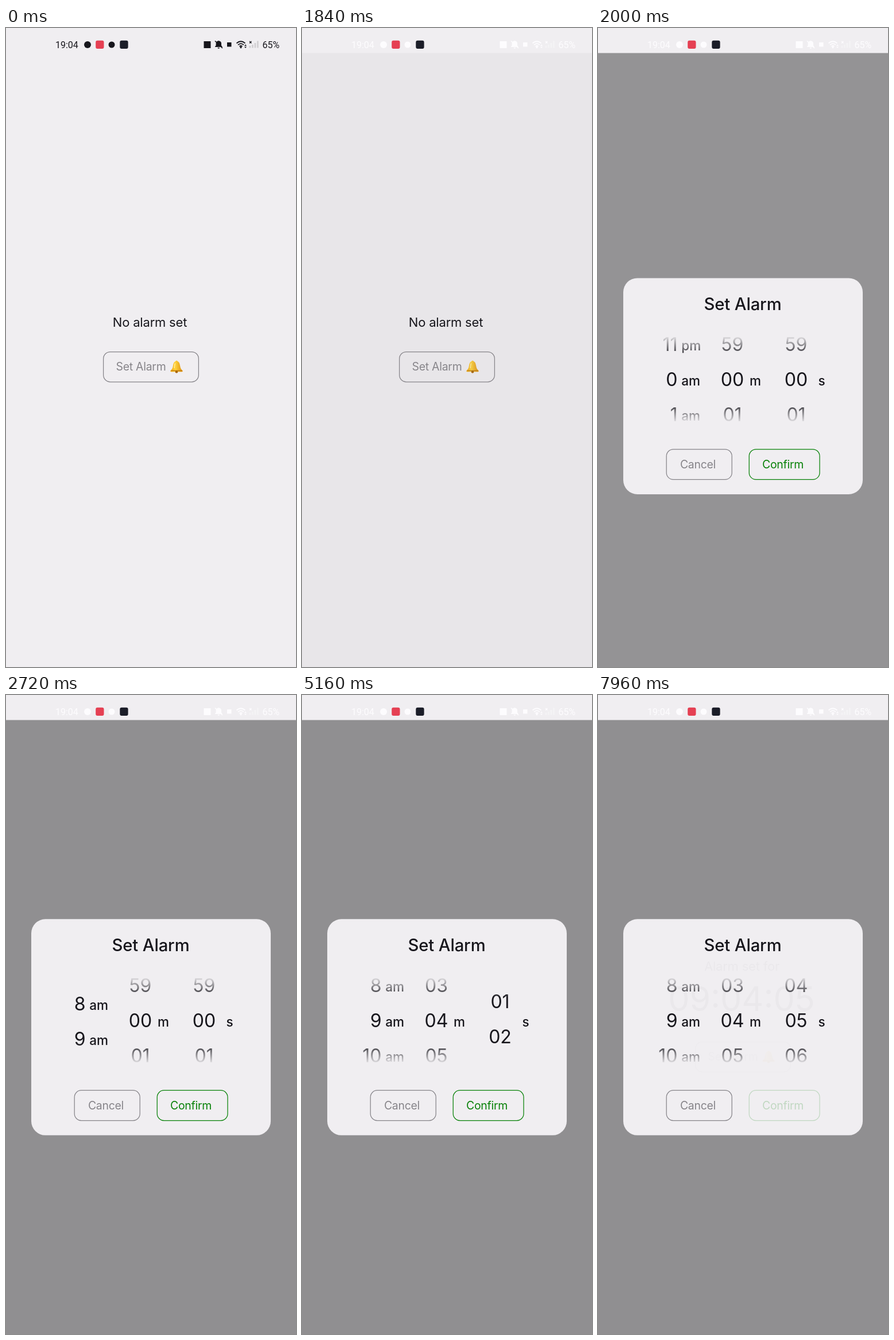
An HTML page for the animation above (8 s loop, 505 by 1110 pixels).

```html
<!DOCTYPE html>
<html lang="en">
<head>
<meta charset="utf-8">
<title>Set Alarm</title>
<style>
  html, body { margin: 0; width: 100%; height: 100%; overflow: hidden; background: #f0eef1; }
  svg { display: block; width: 505px; height: 1110px; font-family: Inter, sans-serif; fill: #17161c; }
  .mid { text-anchor: middle; }
  .end { text-anchor: end; }
  .num { font-size: 32px; }
  .unit { font-size: 22.5px; font-weight: 500; }
  .label { font-size: 22px; letter-spacing: -.2px; }
  .btn { font-size: 19.4px; letter-spacing: -.25px; }
  .box { fill: none; stroke: #868489; stroke-width: 1.25; }
  .grey { fill: #868489; }
  .green { fill: #078107; }
  .box.green { fill: none; stroke: #078107; }
  #status { font: 16px Roboto, sans-serif; }
  #status .line { fill: none; stroke: currentColor; stroke-width: 1.7; }
</style>
</head>
<body>
<svg viewBox="0 0 505 1110">
  <defs>
    <linearGradient id="bellGold" x2="1" y2="0">
      <stop offset="0" stop-color="#f2a80d"/>
      <stop offset=".4" stop-color="#ffd23c"/>
      <stop offset="1" stop-color="#dc8f12"/>
    </linearGradient>
    <linearGradient id="fadeTop" x2="0" y2="1">
      <stop offset="0" stop-color="#f0eef1"/>
      <stop offset="1" stop-color="#f0eef1" stop-opacity="0"/>
    </linearGradient>
    <linearGradient id="fadeBottom" x2="0" y2="1">
      <stop offset="0" stop-color="#f0eef1" stop-opacity="0"/>
      <stop offset="1" stop-color="#f0eef1"/>
    </linearGradient>
    <clipPath id="window"><rect x="90" y="489" width="310" height="152"/></clipPath>
    <g id="bell">
      <path d="M-1.800 -9.500a1.900 1.900 0 0 1 3.600 0C4.800 -8.600 5.600 -5 6.200 -1.500 6.900 2.500 7.600 4.200 10.400 6.400Q11.300 8.500 9 8.700H-9Q-11.300 8.500 -10.400 6.400C-7.600 4.200 -6.900 2.500 -6.200 -1.500 -5.600 -5 -4.800 -8.600 -1.800 -9.500Z" fill="url(#bellGold)"/>
      <path d="M-9.300 6.800H9.300" stroke="#b9740c" stroke-width="1.200"/>
      <circle cy="8.800" r="2.300" fill="#a8650c"/>
      <path d="M-2.800 -5.500Q-3.600 -2 -3.900 2" fill="none" stroke="#ffec9a" stroke-width="1.600" stroke-linecap="round"/>
    </g>
  </defs>

  <rect width="505" height="1110" fill="#f0eef1"/>
  <text class="label mid" x="250.500" y="519">No alarm set</text>
  <g id="setButton">
    <rect class="box" x="169.600" y="562.500" width="165.800" height="52.300" rx="12"/>
    <text class="btn grey mid" x="235" y="595.300">Set Alarm</text>
    <use href="#bell" x="297" y="588.500"/>
  </g>
  <rect id="scrim" y="43.500" width="505" height="1067" fill="#000" opacity="0"/>

  <g id="status" fill="currentColor">
    <text x="86" y="34.800">19:04</text>
    <circle cx="142" cy="29" r="6"/>
    <rect x="156.200" y="21.800" width="14.300" height="14.300" rx="3" fill="#e54053"/>
    <circle cx="184" cy="29" r="5.500"/>
    <rect x="198.300" y="21.800" width="14.300" height="14.300" rx="3" fill="#1b1d28"/>
    <rect x="344.500" y="23" width="12" height="12"/>
    <path d="M364 33V32l1.600-1.600V27q0-3.600 3.500-4.400a1.300 1.300 0 0 1 2.200 0Q375 23.400 375 27v3.400L376.500 32v1zM368.500 34h3.500a1.700 1.700 0 0 1-3.500 0z"/>
    <path class="line" d="M364 22.500L377 35"/>
    <rect x="385" y="25" width="7.500" height="7.500"/>
    <path class="line" d="M401.500 26.500q7.500-6.500 15 0M404 29.300q5-4.500 10 0M406.500 32q2.500-2 5 0"/>
    <circle cx="409" cy="33.700" r="1.600"/>
    <path d="M415 31l2-2.500 2 2.500zM415 32.500h4l-2 2.500z"/>
    <path id="bars" d="M423.500 31h2.800v3.500h-2.800zM428 29h2.800v5.500h-2.800zM432.500 26h2.800v8.500h-2.800zM437 22.500h2.800v12h-2.800z" fill="#d2d0d3"/>
    <path class="line" style="stroke-width:1.200" d="M424 23l3.500 3.500M427.500 23L424 26.500"/>
    <text x="446.500" y="34.800">65%</text>
  </g>

  <g id="modal" transform="translate(0 1110)">
    <rect x="44" y="389.300" width="417" height="375.500" rx="24.600" fill="#f0eef1"/>
    <text class="mid" x="252" y="445" font-size="29.200" font-weight="500" letter-spacing="-.1">Set Alarm</text>
    <g clip-path="url(#window)">
      <g id="hours"></g>
      <g id="minutes"></g>
      <g id="seconds"></g>
      <rect x="90" y="488.500" width="310" height="37" fill="url(#fadeTop)"/>
      <rect x="90" y="604.500" width="310" height="37" fill="url(#fadeBottom)"/>
    </g>
    <text class="unit" x="264" y="575.500">m</text>
    <text class="unit" x="383.500" y="575.500">s</text>
    <rect class="box" x="119.200" y="686.700" width="114" height="52.600" rx="12"/>
    <text class="btn grey mid" x="174" y="719.500">Cancel</text>
    <g id="confirm">
      <rect class="box green" x="263.200" y="686.700" width="122.800" height="52.600" rx="12"/>
      <text class="btn green mid" x="322" y="719.500">Confirm</text>
    </g>
  </g>

  <g id="next" opacity="0">
    <text class="label mid" x="250.500" y="479">Alarm set for</text>
    <text class="mid" x="250" y="548.500" font-size="59">09:04:05</text>
    <rect class="box" x="169.600" y="602.500" width="165.800" height="52.300" rx="12"/>
    <text class="btn grey mid" x="235" y="635.300">Set Alarm</text>
    <use href="#bell" x="297" y="628.500"/>
  </g>
</svg>
<script>
const LOOP = 8000, STEP = 40, ROW = 61, BASE = 576.5;
const $ = id => document.getElementById(id);
const clamp = v => Math.min(1, Math.max(0, v));
const pad = n => String(n).padStart(2, '0');

const quad = p => p < .5 ? 2 * p * p : 1 - 2 * (1 - p) ** 2;
const cubic = p => p < .5 ? 4 * p ** 3 : 1 - 4 * (1 - p) ** 3;
const fling = p => p >= 1 ? 1 : 1 - Math.exp(-7 * p);

// CSS "ease": solve x(s) = p by bisection, then return y(s).
function ease(p) {
  if (p <= 0 || p >= 1) return clamp(p);
  const curve = (a, b, s) => 3 * (1 - s) ** 2 * s * a + 3 * (1 - s) * s * s * b + s ** 3;
  let lo = 0, hi = 1;
  for (let i = 0; i < 24; i++) {
    const s = (lo + hi) / 2;
    if (curve(.25, .25, s) < p) lo = s; else hi = s;
  }
  return curve(.1, 1, lo);
}

// Each move: start, duration, distance, easing.
const travel = (moves, t) =>
  moves.reduce((sum, [start, dur, dist, fn]) => sum + dist * fn(clamp((t - start) / dur)), 0);

const press = [[1350, 150, -.8, quad], [1640, 250, .8, quad]];
const open = [[1817, 245, 1, ease]];
const wheels = {
  hours: [[2505, 530, 9, fling]],
  minutes: [[3560, 810, 4, cubic]],
  seconds: [[4620, 230, 1, quad], [4980, 510, 3, cubic], [6180, 345, 1, quad]]
};

function addText(group, cls, x, y, text) {
  const el = document.createElementNS('http://www.w3.org/2000/svg', 'text');
  el.setAttribute('class', cls);
  el.setAttribute('x', x);
  el.setAttribute('y', y);
  el.textContent = text;
  group.append(el);
}

for (let i = -2; i <= 12; i++) {
  const y = BASE + i * ROW, hour = (i + 24) % 24, n = pad((i + 60) % 60);
  addText($('hours'), 'num end', 138.5, y, hour % 12);
  addText($('hours'), 'unit', 145.3, y - 1, hour < 12 ? 'am' : 'pm');
  addText($('minutes'), 'num mid', 234, y, n);
  addText($('seconds'), 'num mid', 345, y, n);
}

function draw(t) {
  const shown = travel(open, t), light = t >= 1800;
  $('setButton').setAttribute('opacity', 1 + travel(press, t));
  $('scrim').setAttribute('opacity', .4 * shown);
  $('modal').setAttribute('transform', `translate(0 ${1110 * (1 - shown)})`);
  $('status').style.color = light ? '#fdfcfe' : '#17161c';
  $('bars').setAttribute('fill', light ? '#f4f3f5' : '#d2d0d3');
  for (const id in wheels)
    $(id).setAttribute('transform', `translate(0 ${-ROW * travel(wheels[id], t)})`);
  $('confirm').setAttribute('opacity', t < 7800 ? 1 : t < 7960 ? .7 : .2);
  $('next').setAttribute('opacity', t < 7960 ? 0 : .025);
}

const begin = performance.now();
function tick() {
  const t = (performance.now() - begin) % LOOP;
  draw(Math.floor(t / STEP) * STEP);
  requestAnimationFrame(tick);
}
tick();
</script>
</body>
</html>
```
